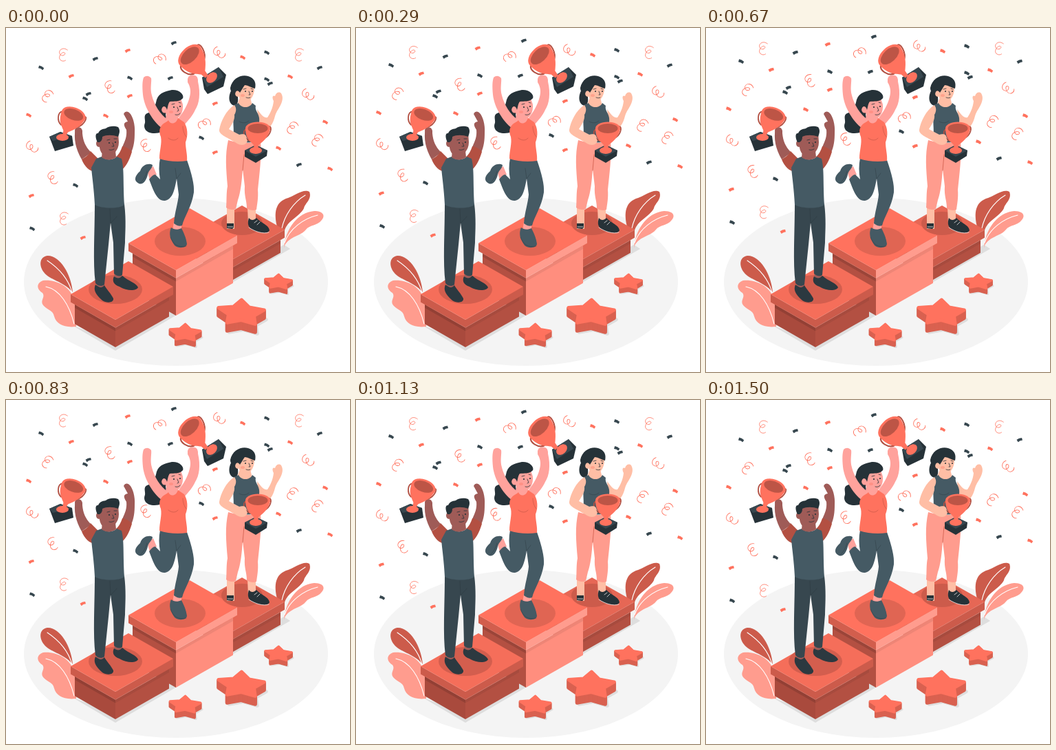
These frames come from a looping animation (500x500 px, 1.54 s). An HTML page:

```html
<!DOCTYPE html>
<html lang="en">
<head>
<meta charset="utf-8">
<title>Winners on a podium</title>
<style>
html, body { margin: 0; height: 100%; overflow: hidden; background: #fff; }
svg { display: block; width: 100vw; height: 100vh; }
.coral { fill: #ff725e; } .light { fill: #ff9c8e; } .deep { fill: #cc5b4b; } .rust { fill: #b35042; }
.slate { fill: #455a64; } .navy { fill: #37474f; } .ink { fill: #263238; }
.brown { fill: #9f5b57; } .pink { fill: #ffa29c; } .peach { fill: #ffbea5; }
.line { fill: none; stroke-linecap: round; stroke-linejoin: round; }
.vein { stroke: #fff; stroke-width: 1.1; }
.fold { stroke: #263238; stroke-width: .7; opacity: .5; }
.face { stroke: #263238; stroke-width: .8; }
.blush { fill: #ff725e; opacity: .35; }
</style>
</head>
<body>
<svg viewBox="0 0 500 500">
<defs>
  <g id="cup">
    <path class="line" stroke="#b35042" stroke-width="1.8" d="M-15-13C-21-10-18 1-10 4M17-16C25-20 20-1 11 0"/>
    <path class="coral" d="M-16-14C-16 2-8 5-4 10L-3 16H2L3 10C11 4 18-2 20-14Z"/>
    <ellipse class="coral" cx="2" cy="-14" rx="18" ry="9.5"/>
    <ellipse fill="#bd5546" cx="2" cy="-14" rx="14.5" ry="7"/>
  </g>
</defs>

<ellipse cx="247" cy="369" rx="221" ry="122" fill="#f4f4f4"/>
<path fill="#dedede" d="M96 432L159 469L413 321L404 315L158 456Z"/>
<g id="confetti"></g>

<!-- leaves -->
<path class="deep" d="M97 384C95 358 78 330 60 331C48 333 48 346 55 355C63 366 83 368 97 384Z"/>
<path class="line vein" d="M60 338C75 348 90 363 96 384"/>
<path class="light" d="M102 434C84 436 73 430 70 419C68 410 62 411 55 404C48 396 58 392 53 385C45 380 43 371 54 367C72 365 91 375 97 390L103 403Z"/>
<path class="line vein" d="M58 376C78 380 92 402 99 430"/>
<path class="deep" d="M395 292C388 268 392 252 410 247C420 243 433 233 441 238C445 249 435 254 433 262C427 274 410 279 405 294Z"/>
<path class="line vein" d="M435 243C418 253 405 272 401 291"/>
<path class="light" d="M404 320C406 292 424 268 448 266C460 266 465 272 459 279C452 288 441 286 436 293C428 303 413 302 405 316Z"/>
<path class="line vein" d="M453 272C432 277 412 292 405 312"/>

<g id="podium"></g>
<ellipse class="deep" cx="343" cy="284" rx="30" ry="17"/>
<ellipse fill="#d35e4e" cx="159" cy="380" rx="39" ry="21"/>
<ellipse fill="#e06553" cx="253" cy="310" rx="37" ry="21"/>
<g id="stars"></g>

<!-- left winner -->
<path class="brown" d="M132 365H143V380H132ZM157 350H168V368H158Z"/>
<path fill="#2c3940" d="M130 373C127 380 129 386 140 396C146 400 157 400 156 393C152 385 147 381 143 374C139 379 135 377 130 373ZM157 361C154 367 156 373 165 376C175 382 189 383 192 377C190 371 178 368 169 360C165 365 161 364 157 361Z"/>
<path class="navy" d="M129 256H172C175 280 173 300 173 312L169 359C165 362 160 360 157 357L156 312L152 283L149 315L143 373C139 376 133 375 130 371C126 340 129 300 129 256Z"/>
<path class="line fold" d="M151 263L152 284L161 274"/>
<path class="brown" d="M101 146C98 160 101 176 110 191L124 181C115 172 112 164 111 153C112 145 106 142 101 146ZM171 125C173 120 178 121 180 124C184 128 188 140 187 152C187 163 186 172 182 181L169 173C173 164 176 158 175 148C170 140 171 137 177 136Z"/>
<path class="rust" d="M110 191C115 188 121 184 123 179L134 190L131 209C121 209 114 201 110 191ZM160 187C164 184 167 178 169 172C174 172 180 176 183 180C179 193 174 203 166 208Z"/>
<path class="slate" d="M131 190L139 187C146 193 156 192 161 187L168 190C172 205 170 224 172 257C165 263 140 263 129 257C128 235 125 215 124 203Z"/>
<path class="brown" d="M140 178H159L160 188C153 193 144 192 139 188Z"/>
<path class="brown" d="M136 157C134 175 137 184 146 186C155 187 164 178 164 166L163 152Z"/>
<ellipse class="brown" cx="135" cy="168" rx="4" ry="5"/>
<path class="ink" d="M133 166C129 158 130 152 134 153C136 148 140 147 145 146C150 142 158 142 163 144C167 149 164 155 163 158C155 155 146 155 140 158C140 163 138 165 136 166Z"/>
<path class="line face" d="M147 163L151 162M157 161L161 161M155 167L157 172L154 172M150 177C153 178 155 177 157 176"/>
<circle class="ink" cx="150" cy="167" r="1.1"/><circle class="ink" cx="159" cy="166" r="1.1"/>
<path class="ink" d="M63 158L79 151L96 157L98 171L71 179Z"/>
<path class="navy" d="M63 158L79 151L96 157L68 164Z"/>
<ellipse class="coral" cx="82" cy="159" rx="9" ry="5"/>
<use href="#cup" transform="translate(91 140) rotate(20) scale(1 1.12)"/>
<path class="brown" d="M100 148C104 142 110 145 111 151L110 157L101 156Z"/>

<!-- middle winner -->
<path class="ink" d="M219 104C223 93 233 92 241 90C251 89 259 96 257 102L236 111L232 126C236 140 232 153 216 153C203 153 199 145 202 138C203 133 199 127 205 124C215 121 217 113 219 104Z"/>
<path class="pink" d="M200 72C204 68 209 70 211 73C212 78 209 88 212 98C215 111 225 127 235 133L227 146C213 135 201 115 199 97C198 85 198 78 200 72ZM265 71C272 66 280 69 279 78C283 95 281 110 275 119C271 128 265 134 260 140L250 132C258 122 264 112 267 100C269 92 268 85 264 79ZM205 207L214 201L219 213L209 221ZM244 281H255V296H242Z"/>
<path class="slate" d="M193 226C185 222 187 215 195 208C198 198 208 196 213 199C213 204 207 207 206 213C205 219 200 229 193 226ZM240 290C236 300 239 307 245 316C251 321 262 320 263 314C262 305 258 297 255 291C249 294 244 293 240 290Z"/>
<path class="line fold" d="M195 225C201 220 203 214 205 208M239 304C243 314 249 320 262 317"/>
<path class="slate" d="M224 189L263 192C270 212 274 228 273 239C270 260 259 274 256 287C252 289 248 287 244 284C245 268 250 255 251 242L248 219C245 236 242 249 231 251C219 252 214 235 208 220C211 216 214 213 217 213L224 220C222 210 222 199 224 189Z"/>
<path class="line fold" d="M246 204L248 219L254 211"/>
<path class="pink" d="M233 126H249L252 137C246 147 235 144 231 138Z"/>
<path class="coral" d="M226 142C230 137 234 137 236 134C239 141 247 140 250 131L259 137C264 145 265 156 261 166C261 176 264 185 263 193C250 195 235 194 223 190C223 178 227 168 225 158C222 151 223 146 226 142Z"/>
<path class="line" stroke="#cc5b4b" stroke-width=".8" d="M236 160C241 164 247 164 250 160M257 143C257 150 260 156 262 158"/>
<path class="pink" d="M232 110C229 124 235 133 243 133C253 132 258 122 257 111L253 100L239 102Z"/>
<ellipse class="pink" cx="230.5" cy="118" rx="4.500" ry="5.500"/>
<path class="ink" d="M224 115C224 100 234 92 244 92C253 91 259 98 257 102C252 108 244 106 238 107C235 111 235 117 234 119C232 112 227 113 226 119Z"/>
<path class="line face" d="M241 111L245 110M251 108L254 109M249 115L251 120L249 121M246 126C249 127 252 126 253 124"/>
<circle class="ink" cx="244" cy="115" r="1.1"/><circle class="ink" cx="253" cy="114" r="1.1"/>
<ellipse class="blush" cx="240" cy="122" rx="3" ry="2"/>
<path class="ink" d="M285 72L309 57L320 68L316 85L293 96L288 89Z"/>
<path class="navy" d="M285 72L309 57L316 71L292 86Z"/>
<ellipse class="coral" cx="299" cy="72" rx="9" ry="6.5" transform="rotate(-43 299 72)"/>
<use href="#cup" transform="translate(278 55) rotate(-43) scale(1.12 1.3)"/>
<path class="pink" d="M264 74C266 68 275 67 278 72L278 78C273 82 267 80 264 78Z"/>

<!-- right winner -->
<path class="ink" d="M329 88C322 98 323 112 333 113C341 108 335 97 337 92Z"/>
<path class="peach" d="M365 118C372 128 376 131 380 130C384 124 388 116 389 106C386 100 388 97 391 99C392 94 397 92 400 95C403 100 402 105 400 110C397 117 393 121 391 128C388 140 383 147 376 147C371 147 368 145 367 140ZM321 260H332V292H321ZM351 260H363V284H352Z"/>
<path class="ink" d="M321 284H331V290L329 292L321 291ZM353 276C351 283 351 289 358 293C368 298 381 300 383 294C382 286 370 283 364 276C360 280 356 280 353 276Z"/>
<path class="line" stroke="#eee" stroke-width=".8" d="M353 290C362 296 374 300 382 297M361 283L365 280M365 286L369 282M322 289H330"/>
<path class="light" d="M323 163C340 168 358 168 370 164C372 185 368 215 366 235C367 247 365 256 364 264C360 266 354 265 350 262C350 250 346 245 347 230L344 205C343 220 341 240 337 250L334 263C329 265 324 264 320 261C321 250 320 240 322 230C320 205 318 185 323 163Z"/>
<path class="line" stroke="#cc5b4b" stroke-width=".8" d="M346 184L344 207"/>
<path class="peach" d="M336 111L340 101H355L358 113L348 120Z"/>
<path class="slate" d="M331 112L338 109C342 117 354 117 358 109L363 113C361 121 370 125 368 137L369 164C355 168 340 167 329 162C333 151 329 140 331 128C333 122 332 117 331 112Z"/>
<path class="line fold" d="M339 136C344 139 350 138 353 135"/>
<path class="peach" d="M332 112C320 119 312 136 310 148C309 155 322 159 336 168C343 172 351 170 351 162C350 156 345 154 339 155L324 147C328 140 333 134 332 126C335 121 335 116 332 112Z"/>
<path class="peach" d="M338 84C336 101 341 107 348 107C357 106 362 96 361 83L350 79Z"/>
<ellipse class="peach" cx="337" cy="95" rx="4" ry="5"/>
<path class="ink" d="M326 87C329 72 343 67 352 70C361 73 364 79 362 88C355 86 351 83 347 83C344 87 342 91 340 94C337 89 333 91 333 97C329 95 326 92 326 87Z"/>
<path class="line face" d="M345 89L349 88M356 88L359 89M353 92L355 97L353 97M349 101C351 102 354 102 355 101"/>
<circle class="ink" cx="348" cy="92" r="1"/><circle class="ink" cx="358" cy="92" r="1"/>
<ellipse class="blush" cx="344" cy="98" rx="3" ry="2"/>
<path class="ink" d="M347 178L363 170L380 178L379 186L363 196L347 187Z"/>
<path class="navy" d="M347 178L363 170L380 178L363 187Z"/>
<ellipse class="coral" cx="363" cy="178" rx="9" ry="5"/>
<use href="#cup" transform="translate(364 160)"/>
<path class="peach" d="M340 155C347 153 350 156 349 160C352 163 349 168 344 168Z"/>
</svg>
<script>
const LOOP = 1540, RISE = 9.4, LEAD = 35;
const SLOPE = .57, LIP = 11.5, INSET = 6;
const CORAL = '#ff725e', DARK = '#37474f';
const layer = id => document.getElementById(id);
const polygon = (points, fill) => `<polygon points="${points.join(' ')}" fill="${fill}"/>`;

// Isometric box with an overhanging lid; (x, y) is the lid's front corner.
function block(x, y, left, right, height, [top, lipLeft, lipRight, sideLeft, sideRight]) {
  const at = (l, r, down) => [x - l + r, y - SLOPE * (l + r) + down];
  const wall = (l, r, from, to, fill) => polygon([at(0, 0, from), at(l, r, from), at(l, r, to), at(0, 0, to)], fill);
  const l = left - INSET, r = right - INSET;
  return wall(l, 0, LIP, height, sideLeft) + wall(0, r, LIP, height, sideRight)
    + wall(l, 0, LIP, LIP + 5, '#0002') + wall(0, r, LIP, LIP + 5, '#0001')
    + wall(left, 0, 0, LIP, lipLeft) + wall(0, right, 0, LIP, lipRight)
    + polygon([at(0, 0, 0), at(left, 0, 0), at(left, right, 0), at(0, right, 0)], top);
}
layer('podium').innerHTML =
  block(330, 336, 62, 75, 30, ['#e66755', '#cc5b4b', '#cc5b4b', '#b35042', '#b35042'])
  + block(247, 352, 69, 89, 66, [CORAL, '#d25e4d', '#ff9c8e', '#b35042', '#ff8e7e'])
  + block(159, 424, 65, 84, 40, ['#f56e5a', '#cc5b4b', '#cc5b4b', '#a94a3d', '#b35042']);

// Five-pointed star lying on the floor, extruded downwards.
function star(x, y, size) {
  const outline = Array.from({ length: 10 }, (_, i) => {
    const angle = i * Math.PI / 5, radius = i % 2 ? .53 : .95;
    const c = radius * Math.cos(angle), s = radius * Math.sin(angle);
    return [35 * c + 11 * s, 19.5 * s - 4.3 * c];
  }).join(' ');
  const slab = (dx, dy, color) => `<polygon points="${outline}" fill="${color}" stroke="${color}" stroke-width="5"
    stroke-linejoin="round" transform="translate(${x + dx * size} ${y + dy * size}) scale(${size})"/>`;
  let art = slab(3, 14, '#dedede');
  for (let depth = 12; depth > 0; depth--) art += slab(0, depth, '#d96150');
  return art + slab(0, 0, CORAL);
}
layer('stars').innerHTML = star(342, 414, 1) + star(260.5, 443, .67) + star(396, 369, .58);

// Confetti: neighbours in a list lean opposite ways, ribbons turn step by step.
const darkPaper = [[51,58], [244,22], [180,73], [239,73], [115,103], [120,96], [379,75], [384,81],
  [101,229], [456,58], [38,292], [426,199], [379,36], [130,45], [284,160]];
const coralPaper = [[344,43], [177,33], [413,71], [95,70], [33,127], [180,99], [145,128], [304,110],
  [464,137], [304,181], [396,175], [37,244], [471,205], [112,305]];
const ribbons = [[38,173], [151,86], [83,39], [60,99], [288,139], [310,36], [68,218], [84,277],
  [416,145], [223,45], [439,97], [203,171], [426,39], [452,163]];

const paper = color => ([x, y], i) => `<path fill="${color}"
  transform="translate(${x} ${y}) rotate(${i % 2 ? -24 : 24})" d="M-4-2Q0-3 4-1.5L3.500 2Q0 .8-3.500 2Z"/>`;
const ribbon = ([x, y], i) => `<path class="line" stroke="${CORAL}" stroke-width=".8"
  transform="translate(${x} ${y}) rotate(${i % 5 * 30 - 60}) scale(.9 1.15)"
  d="M7-6C1-10-6-7-6-3C-5 3 4 1 3-2C1-5-6-1-6 4C-5 8 1 9 4 7"/>`;
const confetti = layer('confetti');
confetti.innerHTML = [...darkPaper.map(paper(DARK)), ...coralPaper.map(paper(CORAL)), ...ribbons.map(ribbon)].join('');

function draw(time) {
  const phase = 2 * Math.PI * (time + LEAD) / LOOP;
  confetti.setAttribute('transform', `translate(0 ${-RISE * (1 - Math.cos(phase)) / 2})`);
}
const start = performance.now();
(function tick() {
  draw((performance.now() - start) % LOOP);
  requestAnimationFrame(tick);
})();
</script>
</body>
</html>
```
